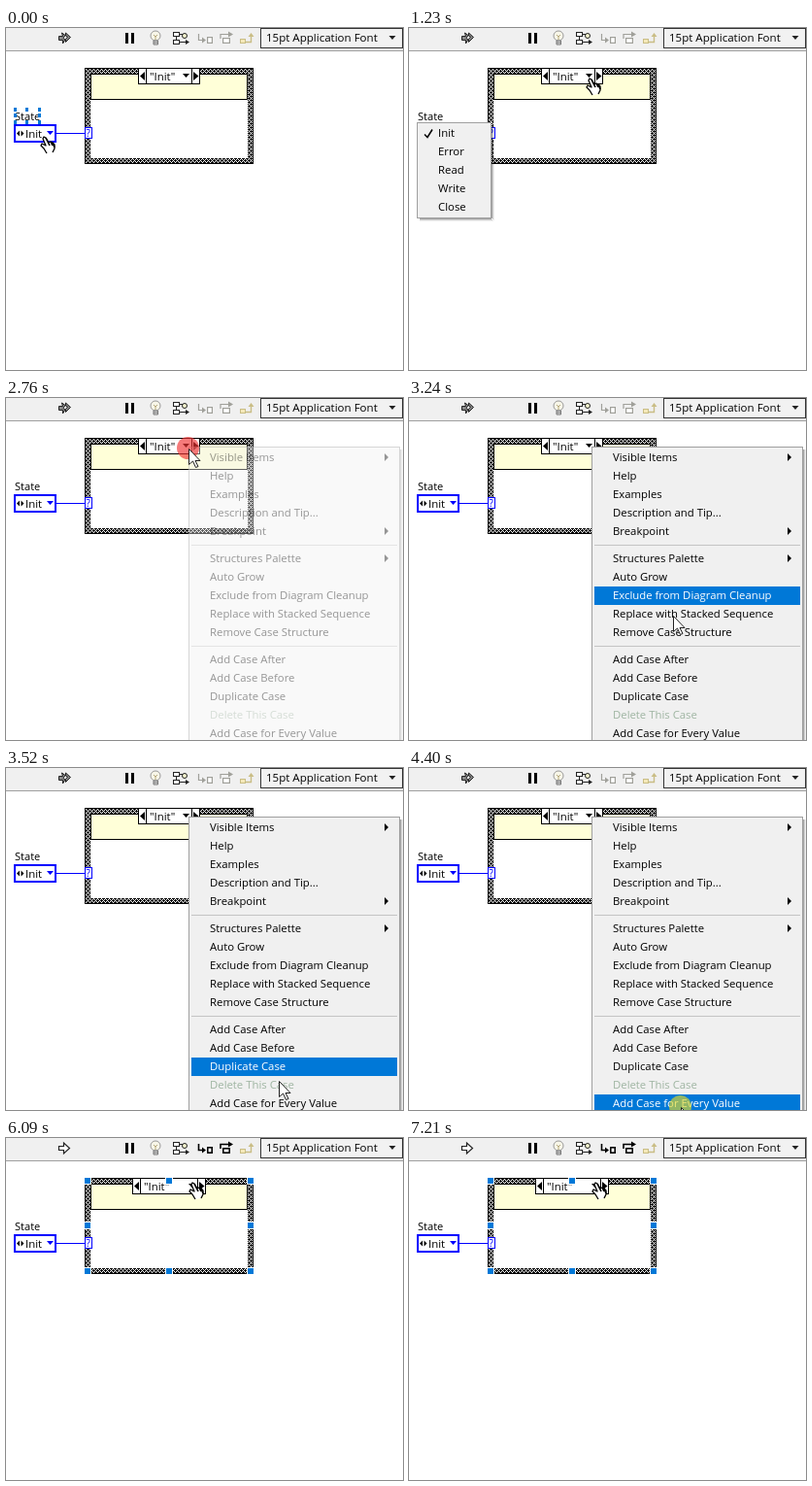
Write an HTML page with a canvas that moves like this. It is 409 by 352 pixels and loops after 7.28 s.

```html
<!DOCTYPE html>
<html>
<head>
<meta charset="utf-8">
<style>
html, body { margin: 0; width: 100%; height: 100%; overflow: hidden; background: #fff; }
canvas { display: block; }
</style>
</head>
<body>
<canvas id="stage" width="409" height="352"></canvas>
<script>
const ctx = document.getElementById('stage').getContext('2d');
const LOOP = 7280, BLUE = '#0000ff', ACCENT = '#0078d7';
const FONT = '"Open Sans", "Noto Sans", sans-serif';
const LEFT_CLICK = 'rgba(225,215,40,.65)', RIGHT_CLICK = 'rgba(240,50,50,.65)';

const STATES = ['Init', 'Error', 'Read', 'Write', 'Close'];
const CASES = STATES.map(s => `"${s}"`);
// '' is a separator, '>' opens a submenu, '-' is disabled
const ACTIONS = ['Visible Items>', 'Help', 'Examples', 'Description and Tip...', 'Breakpoint>', '',
  'Structures Palette>', 'Auto Grow', 'Exclude from Diagram Cleanup', 'Replace with Stacked Sequence',
  'Remove Case Structure', '', 'Add Case After', 'Add Case Before', 'Duplicate Case',
  '-Delete This Case', 'Add Case for Every Value'];

const smooth = p => p * p * (3 - 2 * p);
const out = n => p => 1 - (1 - p) ** n;
// start, end, steps, x, y, easing of x, easing of y
const MOVES = [
  [530, 1230, 11, 188, 52, smooth, smooth],
  [3170, 3590, 7, 281, 323, out(7), out(3)],
  [3790, 3990, 4, 280, 349, smooth, smooth],
  [4800, 5420, 10, 194, 46, smooth, smooth]
];
const CLICKS = [[70, 270], [1300, 1510], [2300, 2430], [2690, 2900, RIGHT_CLICK], [4340, 4470],
  [5550, 5690], [6420, 6620], [7080, 7210]];

const within = (t, a, b) => t >= a && t < b;

// Progress 0..1 in even jumps, the first one at start and the last one at end
function stepped(t, start, end, steps) {
  if (t < start) return 0;
  const k = Math.floor((t - start + 5) / (end - start) * (steps - 1)) + 1;
  return Math.min(k, steps) / steps;
}
const fadeIn = (t, start, end) => Math.max(0, Math.min(1, (stepped(t, start, end, 4) * 4 - 1) * 0.4));

function pointer(t) {
  let x = 41, y = 112;
  for (const [start, end, steps, toX, toY, easeX, easeY] of MOVES) {
    const p = stepped(t, start, end, steps);
    x += (toX - x) * easeX(p);
    y += (toY - y) * easeY(p);
  }
  return { x: Math.round(x), y: Math.round(y) };
}

function box(x, y, w, h, fill, stroke, width = 1) {
  if (fill) { ctx.fillStyle = fill; ctx.fillRect(x, y, w, h); }
  if (stroke) {
    ctx.strokeStyle = stroke;
    ctx.lineWidth = width;
    ctx.strokeRect(x + width / 2, y + width / 2, w - width, h - width);
  }
}
function text(str, x, y, color = '#000', size = 11.35) {
  ctx.font = `${size}px ${FONT}`;
  ctx.fillStyle = color;
  ctx.fillText(str, x, y);
}
function shape(d, fill, stroke, width = 1, x = 0, y = 0) {
  const path = new Path2D(d);
  ctx.save();
  ctx.translate(x, y);
  if (fill) { ctx.fillStyle = fill; ctx.fill(path); }
  if (stroke) { ctx.strokeStyle = stroke; ctx.lineWidth = width; ctx.stroke(path); }
  ctx.restore();
}
function disc(x, y, r, fill, stroke) {
  ctx.beginPath();
  ctx.arc(x, y, r, 0, 7);
  if (fill) { ctx.fillStyle = fill; ctx.fill(); }
  if (stroke) { ctx.strokeStyle = stroke; ctx.lineWidth = 1; ctx.stroke(); }
}
const dropArrow = (x, y, color) => shape('M0 0H7L3.5 4Z', color, null, 1, x, y);

// Crossing white diagonals on black
const tile = document.createElement('canvas');
tile.width = tile.height = 4;
const weave = tile.getContext('2d');
for (let i = 0; i < 16; i++) {
  const x = i % 4, y = i >> 2;
  weave.fillStyle = (x + y) % 4 === 0 || x === y ? '#fff' : '#000';
  weave.fillRect(x, y, 1, 1);
}
const hatch = ctx.createPattern(tile, 'repeat');

function toolbar(runnable) {
  box(0, 0, 409, 23, '#f0f0f0');
  box(0, 23, 409, 1, '#a0a0a0');
  if (runnable) {
    shape('M54.5 8.5H59.5V5L65.5 10.5L59.5 16V12.5H54.5Z', '#fff', '#222', 1.2);
  } else {
    shape('M54.5 8.5H58.5L57.5 5L61 7.5L59 10.5L61 12L58.5 16V12.5H54.5Z', '#888', '#222');
    shape('M61.5 5L66.5 9.5L61.5 14.5V11.5L63.5 9L61.5 8Z', '#888', '#222');
  }
  box(123, 5, 3, 11, '#000');
  box(129, 5, 3, 11, '#000');
  disc(154, 8, 5, '#f8f6e8', '#999');
  shape('M152 13H156.5V17H152Z M152 15H156.5', '#ddd', '#777');
  shape('M154 12V8M152 7L154 9L156 7', null, '#b5a878');
  box(172, 4, 7, 5, '#fff', '#222');
  box(172, 12, 7, 5, '#fff', '#222');
  shape('M175.5 9V12M179 6.5H182M179 14.5H187', null, '#222');
  disc(184, 8, 2.5, '#f4f4d0', '#222');
  shape('M185 12L189 14.5L185 17Z', '#222');

  const ink = runnable ? '#000' : '#a0a09a', width = runnable ? 1.6 : 1.2;
  shape('M198.5 6V12.5H203', null, ink, width);
  shape('M202 9.5L206 12.5L202 15.5Z', ink);
  box(207, 9, 6, 7, '#fff', ink, width);
  shape('M221 11V6.5H230', null, ink, width);
  shape('M229 3.5L234 6.5L229 9.5Z', ink);
  box(223, 10, 8, 6, '#fff', ink, width);
  box(241, 11, 6, 5, '#f4e8b8', '#c9bd85');
  shape('M247 14.5H252.5V8', null, '#c9bd85', 1.4);
  shape('M249.5 9L252.5 5L255.5 9Z', '#c9bd85');

  box(262, 0, 147, 21, '#f2f2f2', '#333');
  text('15pt Application Font', 268, 14, '#000', 11.55);
  dropArrow(394.5, 8, '#222');
}

function enumControl(hovered) {
  text('State', 9, 95, '#000', 11.1);
  if (hovered) {
    for (const x of [8, 20, 33]) for (const y of [82, 88, 95])
      if (x !== 20 || y !== 88) box(x, y, 3, 4, ACCENT);
  }
  box(52, 108, 30, 1, BLUE);
  box(8, 99, 44, 19, '#fff', BLUE, 2);
  shape('M14 105.5V111.5L11 108.5Z M15.5 105.5V111.5L18.5 108.5Z', '#000');
  text('Init', 20, 113);
  dropArrow(42, 106, BLUE);
}

function caseStructure(left, right, selected) {
  box(81, 41, 174, 99, hatch, '#000');
  box(87, 47, 162, 87, '#fff');
  box(87, 47, 162, 27, '#ffffd8', '#000');

  box(left, 41, right - left, 17, '#fff', '#000');
  box(left + 8, 41, 1, 17, '#000');
  box(right - 9, 41, 1, 17, '#000');
  shape(`M${left + 7} 45V54L${left + 2} 49.5Z M${right - 7} 45V54L${right - 1.5} 49.5Z`, '#000');
  text('"Init"', left + 12, 54);
  dropArrow(right - 18, 47, '#000');

  box(81, 102, 8, 12, '#fff', BLUE);
  text('?', 82.5, 112, BLUE, 10);

  if (selected) {
    for (const x of [84, 168, 252]) for (const y of [44, 90, 137])
      if (x !== 168 || y !== 90) {
        box(x - 4, y - 4, 8, 8, '#fff');
        box(x - 3, y - 3, 6, 6, ACCENT);
      }
  }
}

// A row is lit where (hotX, hotY) falls; the first one may carry a check mark
function menu(items, x, y, w, alpha, hotX, hotY, checked) {
  const h = 4 + items.reduce((sum, s) => sum + (s ? 19 : 9), 0);
  ctx.save();
  ctx.globalAlpha = alpha;
  for (const [i, shade] of ['rgba(0,0,0,.35)', 'rgba(0,0,0,.18)', 'rgba(0,0,0,.07)'].entries()) {
    box(x + w + i, y + 3, 1, h - 3 + i, shade);
    box(x + 3, y + h + i, w - 3 + i, 1, shade);
  }
  box(x, y, w, h, '#f0f0f0', '#a0a0a0');

  let top = y + 1.5;
  items.forEach((item, i) => {
    if (!item) {
      box(x + 3, Math.round(top + 4), w - 6, 1, '#c4c4c4');
      top += 9;
      return;
    }
    const off = item[0] === '-';
    const hot = !off && hotX > x + 3 && hotX < x + w && hotY >= top && hotY < top + 19;
    const ink = off ? '#9fb5a2' : hot ? '#fff' : '#000';
    if (hot) box(x + 3, Math.round(top), w - 6, 19, ACCENT);
    text(item.replace(/^-|>$/g, ''), x + 22, top + 13.5, ink);
    if (item.endsWith('>')) shape('M0 -4L4 0L0 4Z', ink, null, 1, x + w - 16, top + 9.5);
    if (checked && i === 0) shape('M0 0L3 3L8 -5', null, ink, 1.5, x + 8, top + 11);
    top += 19;
  });
  ctx.restore();
}

function cursor(x, y, hand) {
  ctx.lineJoin = 'round';
  if (hand) {
    shape('M1 17L-2 12L-5 9L-4 7L-2 8L0 9L-3 2L-2 0L0 1L3 6L5 5L7 6L9 8L9 12L7 16', '#fff', '#000', 1.3, x, y);
    shape('M0 1L4 9M5 5L7 9M7 6L9 11', null, '#000', 1.6, x, y);
  } else {
    shape('M0 0V16L4 12.5L7 19L9.5 18L6.5 12H11.5Z', '#fff', '#222', 1, x + 0.5, y + 0.5);
  }
  ctx.lineJoin = 'miter';
}

function draw(t) {
  const { x, y } = pointer(t);
  const expanded = t >= 4470;
  box(0, 0, 409, 352, '#fff');
  toolbar(expanded);
  enumControl(t < 70);
  caseStructure(expanded ? 130 : 136, expanded ? 206 : 200,
    within(t, 2300, 2690) || within(t, 5300, 6420) || t >= 7080);

  if (within(t, 70, 1300)) menu(STATES, 8, 97, 77, fadeIn(t, 70, 270), x, y, true);
  if (within(t, 1300, 2300)) menu(CASES.slice(0, 2), 138, 42, 124, fadeIn(t, 1300, 1510), x, y, true);
  if (within(t, 2690, 4470)) {
    const lag = within(t, 3170, 3590) ? 20 : 0;
    menu(ACTIONS, 188, 50, 218, fadeIn(t, 2690, 2900), x, y - lag);
  }
  if (within(t, 6420, 7080)) menu(CASES, 132, 43, 147, fadeIn(t, 6420, 6620), x, y, true);

  for (const [start, end, color = LEFT_CLICK] of CLICKS)
    if (within(t, start, end)) disc(x - 0.5, y - 0.5, 11.5, color);
  cursor(x, y, !within(t, 2690, 6020));
}

const began = performance.now();
function tick() {
  draw((performance.now() - began) % LOOP);
  requestAnimationFrame(tick);
}
tick();
</script>
</body>
</html>
```
